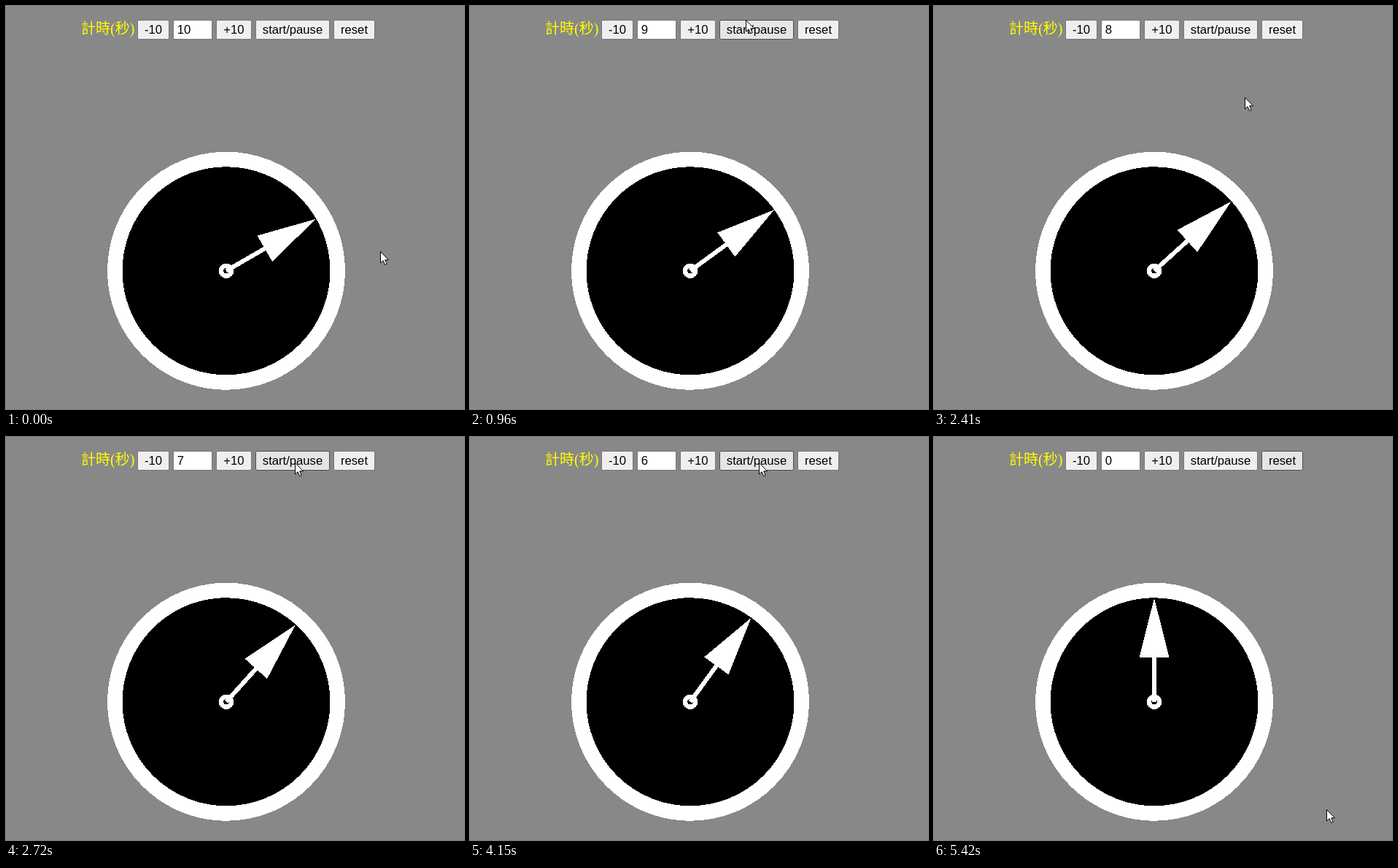
An HTML page that plays this animation: 628x552 px, repeating every 5950 ms.

```html
<!DOCTYPE html>
<html lang="zh-Hant">
<head>
<meta charset="utf-8">
<title>計時</title>
<style>
  html, body { margin: 0; width: 100%; height: 100%; overflow: hidden; background: #888; }
  svg { display: block; width: 628px; height: 552px; }
  .ui { font: 16.67px "Liberation Sans", Arial, sans-serif; fill: #000; }
  .label { font: 20px "Liberation Serif", "Noto Sans CJK TC", "Noto Sans CJK", serif; fill: #ff0; }
  .button text { text-anchor: middle; }
  .button rect { fill: #efefef; stroke: #767676; }
  .button.hover rect { fill: #e5e5e5; stroke: #4f4f4f; }
  .button.active rect { fill: #f5f5f5; stroke: #8d8d8d; }
  .dial { shape-rendering: crispEdges; }
</style>
</head>
<body>
<svg viewBox="0 0 628 552">
  <rect width="628" height="552" fill="#888"/>
  <text class="label" x="103" y="38">計時(秒)</text>
  <g class="ui" id="controls">
    <rect x="229.5" y="19.5" width="53" height="26" fill="#fff" stroke="#767676"/>
    <text id="value" x="234.8" y="38">10</text>
  </g>
  <g class="dial" transform="translate(302 362.75)">
    <circle r="152.75" fill="#000" stroke="#fff" stroke-width="20.5"/>
    <circle r="7" fill="none" stroke="#fff" stroke-width="6.5"/>
    <path id="hand" fill="#fff" d="M0-142L20.5-61H3V0H-3V-61H-20.5Z"/>
  </g>
  <path id="cursor" fill="#fff" stroke="#000" d="M0 0V15.5L3.6 12.2L6.2 18L8.7 17L6.2 11.3H11Z"/>
</svg>
<script>
const LOOP = 5950;
const FRAME = 72;
const FIRST_TICK = 650, SECOND = 1003;
const PAUSED = 3990, CLEARED = 4930, POINTER_LEAVES = 5240;
const PRESSES = [360, PAUSED, 4780], PRESS_LENGTH = 150;

const SVG = "http://www.w3.org/2000/svg";
const byId = id => document.getElementById(id);

function add(parent, tag, attrs) {
  const node = document.createElementNS(SVG, tag);
  for (const key in attrs) node.setAttribute(key, attrs[key]);
  return parent.appendChild(node);
}

function addButton(label, left, right) {
  const group = add(byId("controls"), "g", { class: "button" });
  add(group, "rect", { x: left + 0.5, y: 19.5, width: right - left - 1, height: 26, rx: 2 });
  add(group, "text", { x: (left + right) / 2, y: 38 }).textContent = label;
  return { group, left, right };
}

const buttons = [
  addButton("-10", 180, 224),
  addButton("+10", 288, 337),
  addButton("start/pause", 342, 444),
  addButton("reset", 449, 506)
];

// Pointer strokes, each continuing from the end of the one before.
const home = { x: 514, y: 337 };
const strokes = [
  { from: 70, to: 360, x: 371, y: 20 },
  { from: 960, to: 1190, x: 424, y: 22 },
  { from: 1440, to: 1600, x: 438, y: 142 },
  { from: 1670, to: 1670, x: 431, y: 137 },
  { from: 2410, to: 2720, x: 397, y: 36 },
  { from: 4250, to: 4610, x: 492, y: 33 },
  { from: POINTER_LEAVES, to: 5420, x: 548, y: 600 }
];

const smooth = p => p * p * (3 - 2 * p);
const mix = (a, b, p) => Math.round(a + (b - a) * p);

function pointerAt(time) {
  let { x, y } = home;
  for (const stroke of strokes) {
    if (time < stroke.from) break;
    const steps = Math.round((stroke.to - stroke.from) / FRAME) + 1;
    const step = Math.floor((time - stroke.from) / FRAME + 0.1) + 1;
    const p = smooth(Math.min(1, step / steps));
    x = mix(x, stroke.x, p);
    y = mix(y, stroke.y, p);
  }
  return { x, y };
}

function secondsAt(time) {
  if (time >= CLEARED) return 0;
  const running = Math.min(time, PAUSED) - FIRST_TICK;
  return 10 - Math.max(0, Math.floor(running / SECOND) + 1);
}

function draw(time) {
  const seconds = secondsAt(time);
  byId("value").textContent = seconds;
  byId("hand").setAttribute("transform", `rotate(${seconds * 6})`);

  const { x, y } = pointerAt(time);
  byId("cursor").setAttribute("transform", `translate(${x - 0.5} ${y - 0.5})`);

  // The last hovered button stays highlighted once the pointer has left.
  const spot = pointerAt(Math.min(time, POINTER_LEAVES - 1));
  const pressed = PRESSES.some(press => time >= press && time < press + PRESS_LENGTH);
  for (const { group, left, right } of buttons) {
    const over = spot.x >= left && spot.x < right && spot.y >= 19 && spot.y < 46;
    group.setAttribute("class", "button" + (over ? pressed ? " active" : " hover" : ""));
  }
}

const begin = performance.now();
function tick() {
  draw((performance.now() - begin) % LOOP);
  requestAnimationFrame(tick);
}
tick();
</script>
</body>
</html>
```
